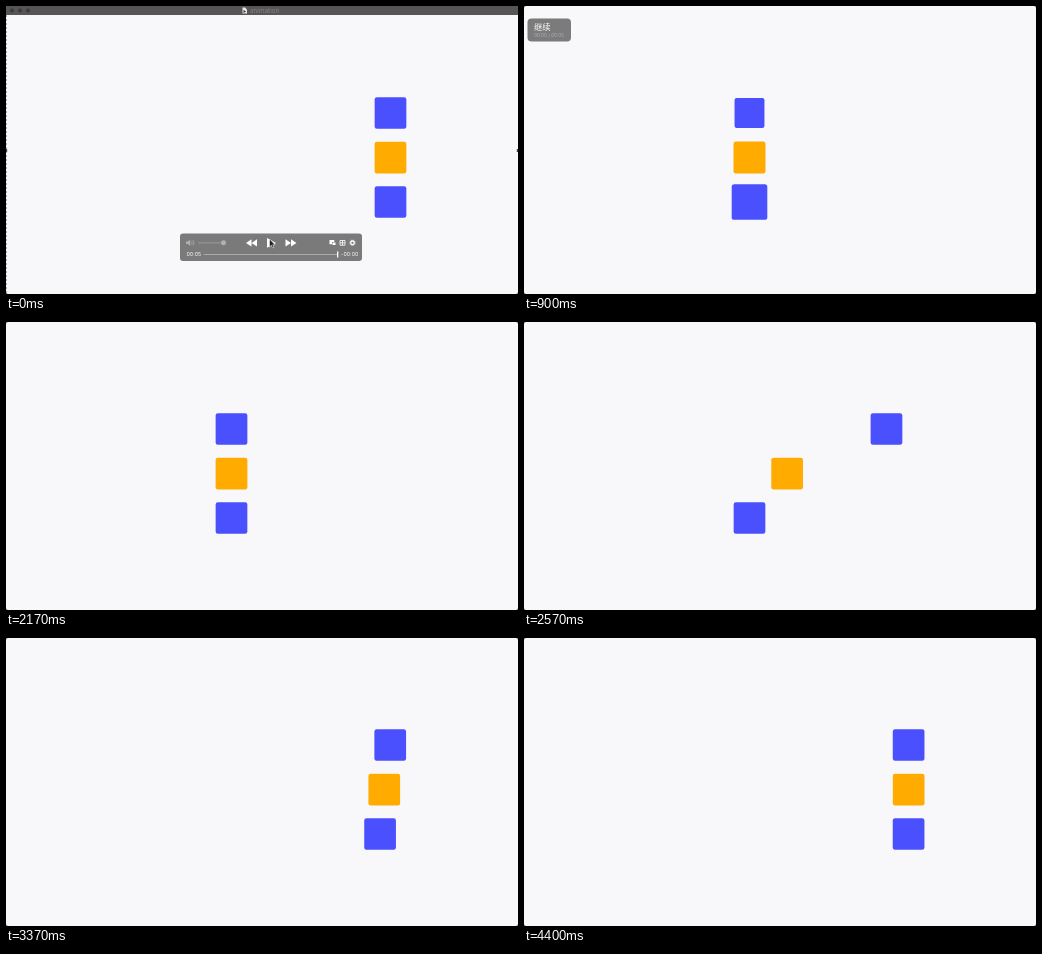
An HTML page for the animation above (4.43 s loop, 512 by 288 pixels).

```html
<!DOCTYPE html>
<html lang="zh">
<head>
<meta charset="utf-8">
<style>
  html, body { margin: 0; height: 100%; overflow: hidden; background: #333; }
  svg { display: block; width: 512px; height: 288px; }
  text { font-family: Inter, "Noto Sans CJK SC", "Noto Sans CJK", sans-serif; }
</style>
</head>
<body>
<svg viewBox="0 0 512 288">
  <rect width="512" height="288" rx="2" fill="#f8f8fb"/>
  <g id="boxes"></g>

  <g id="osd">
    <rect x="3.5" y="12.5" width="43.5" height="23" rx="4" fill="#7b7b7b"/>
    <text x="10" y="24" font-size="8.3" font-weight="500" fill="#fff">继续</text>
    <text x="10" y="31.3" font-size="4.6" fill="#b4b4b4">00:00 / 00:05</text>
  </g>

  <g id="chrome">
    <rect width="512" height="9" fill="#575556"/>
    <g fill="#3d3b3c">
      <circle cx="6" cy="4.5" r="2"/><circle cx="14" cy="4.5" r="2"/><circle cx="22" cy="4.5" r="2"/>
    </g>
    <path d="M236.5 1.5h2.5l2 2v4h-4.5z" fill="#e8e8e8"/>
    <path d="M237.5 4l2.5 1.5-2.5 1.5z" fill="#333"/>
    <text x="244" y="6.8" font-size="6.4" fill="#868485">animation</text>
    <path d="M.5 9V288" stroke="#aaa" stroke-dasharray="2 2"/>
    <path d="M0 143h1.2v3H0zM510.8 143h1.2v3h-1.2z" fill="#444"/>

    <rect x="174" y="227.5" width="182" height="27.5" rx="3" fill="#7a7a7a"/>
    <g fill="#b0b0b0">
      <path d="M180 235.5h1.8l2.4-2v6.6l-2.4-2H180z"/>
      <circle cx="217.5" cy="236.8" r="2.5"/>
    </g>
    <path d="M185.5 235q1.4 1.8 0 3.6M187 234q2.2 2.8 0 5.6" fill="none" stroke="#b0b0b0" stroke-width=".7"/>
    <path d="M192 236.8h23" stroke="#999"/>
    <g fill="#fff">
      <path d="M245.5 233.2v7.4l-5.5-3.7zM251 233.2v7.4l-5.5-3.7z"/>
      <path d="M279.500 233.2v7.4l5.500-3.700zM285 233.2v7.4l5.500-3.700z"/>
      <path d="M261 232l9 4.900-9 4.900z"/>
      <path d="M323.500 234h4.800v2h-2.300v2.200h-2.500zM326.500 236.500h3v2.600h-3z"/>
      <rect x="331" y="245.500" width="1.300" height="6"/>
    </g>
    <path d="M334 234.500h5v4.700h-5zM334 236.800h5M336.500 234.500v4.700" fill="none" stroke="#fff" stroke-width=".8"/>
    <circle cx="346.500" cy="236.800" r="1.800" fill="none" stroke="#fff" stroke-width="1.300"/>
    <circle cx="346.500" cy="236.800" r="2.700" fill="none" stroke="#fff" stroke-width=".8" stroke-dasharray="1.060 1.060"/>
    <path d="M197.500 248.500H331" stroke="#aaa"/>
    <g font-size="5.300" fill="#fff">
      <text x="180.500" y="250.400">00:05</text>
      <text x="335" y="250.400">-00:00</text>
    </g>
    <path d="M263.500 233v8l1.900-1.700 1.200 2.600 1.300-.6-1.200-2.500h2.400z" fill="#222" stroke="#fff" stroke-width=".5"/>
  </g>
</svg>
<script>
const LOOP = 4430, PLAY = 30;
const LEFT = 225.5, TRAVEL = 159, SIZE = 31.7;
const boxes = [
  { y: 107, color: '#4b50ff', grow: 240, move: 2408 },
  { y: 151.6, color: '#ffab00', grow: 328, move: 2520 },
  { y: 196, color: '#4b50ff', grow: 415, move: 2610 }
];
const byId = id => document.getElementById(id);
const clamp = v => Math.max(0, Math.min(1, v));

function elastic(age) {
  if (age <= 0) return 0;
  const phase = age * 0.0081;
  return 1 - Math.exp(-0.441 * phase) * Math.cos(phase);
}

for (const box of boxes) {
  box.el = document.createElementNS('http://www.w3.org/2000/svg', 'rect');
  const attrs = { x: -SIZE / 2, y: -SIZE / 2, width: SIZE, height: SIZE, rx: 2.3, fill: box.color };
  for (const name in attrs) box.el.setAttribute(name, attrs[name]);
  byId('boxes').append(box.el);
}

function draw(t) {
  const ended = t < PLAY;
  for (const { el, y, grow, move } of boxes) {
    const x = LEFT + TRAVEL * (ended ? 1 : elastic(t - move));
    const scale = ended ? 1 : elastic(t - grow);
    el.setAttribute('transform', `translate(${x} ${y}) scale(${scale})`);
  }
  byId('chrome').setAttribute('opacity', 1 - clamp((t - PLAY) / 250));
  byId('osd').setAttribute('opacity', ended ? 0 : 1 - clamp((t - 1300) / 250));
}

const start = performance.now();
function tick() {
  draw((performance.now() - start) % LOOP);
  requestAnimationFrame(tick);
}
tick();
</script>
</body>
</html>
```
